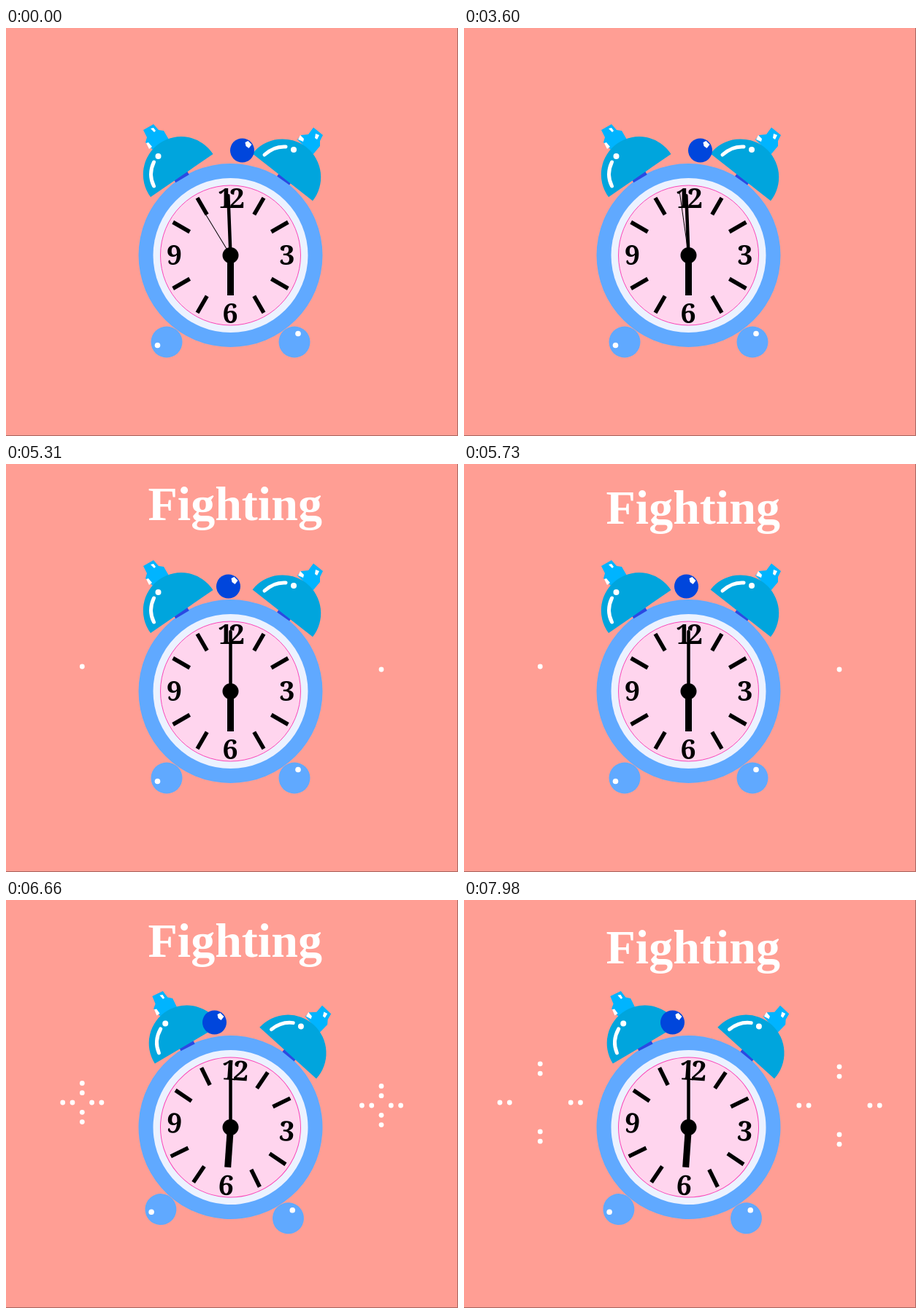
Write an HTML page that moves like this. It is 619x560 px and loops after 8 s.

```html
<!DOCTYPE html>
<html lang="en">
<head>
<meta charset="utf-8">
<title>Alarm clock</title>
<style>
  html, body { margin: 0; width: 100%; height: 100%; overflow: hidden; background: #ff9e94; }
  svg { display: block; width: 619px; height: 560px; }
  text { font-weight: bold; }
  #title { font-family: "Liberation Serif", "Times New Roman", serif; font-size: 66px; }
  .digits { font-family: "Noto Serif", serif; font-size: 37.5px; text-anchor: middle; }
  .blue { fill: #60a9ff; }
  .bell { fill: #00a5dd; }
  .cap { fill: #00b4ff; }
  .shine { fill: none; stroke: #fff; stroke-width: 5; stroke-linecap: round; }
  .white { fill: #fff; }
  .black { stroke: #000; }
</style>
</head>
<body>
<svg viewBox="0 0 619 560">
  <rect width="619" height="560" fill="#ff9e94"/>
  <path d="M618.5 0V559.5H0" fill="none" stroke="#a8655f"/>

  <g id="party" class="white" visibility="hidden">
    <g id="sparks"></g>
    <text id="title" x="194.5" y="76.8">Fighting</text>
  </g>

  <g id="body">
    <g class="blue">
      <circle cx="220" cy="431" r="21.5"/>
      <circle cx="395" cy="431" r="21.5"/>
      <circle cx="307.5" cy="312" r="126"/>
    </g>
    <g class="white">
      <circle cx="207.5" cy="435.5" r="3.8"/>
      <circle cx="400" cy="419.5" r="3.8"/>
    </g>
    <path d="M231 210L249.5 199M372.5 201.5L389.5 213.500" stroke="#2b49e2" stroke-width="5"/>

    <!-- left bell -->
    <path class="cap" d="M188 140L202 132L209 140L216 141L223 153L202 168L191 157L193 150Z"/>
    <path class="white" d="M198 138l4-1 3 4-2 2zM192 158l3-1 5 6-4 3z"/>
    <path class="bell" d="M198 232A51.97 51.97 0 1 1 283.5 173Z"/>
    <path class="shine" d="M202.5 184Q194.5 201 202.5 217"/>
    <circle class="white" cx="208.5" cy="176" r="4"/>

    <!-- right bell -->
    <path class="cap" d="M421 136.500L434 147L430 155L430 162L420 174L399 153L404 147L414 146Z"/>
    <path class="white" d="M424 145l5 2-3 6-3-2zM400 153l3-6 5 5-1 4z"/>
    <path class="bell" d="M337.6 172.4A52.4 52.4 0 0 1 420 237.2Z"/>
    <path class="shine" d="M354 174Q367 162 383 163"/>
    <circle class="white" cx="394" cy="167" r="4"/>

    <!-- dial -->
    <circle cx="307.5" cy="312" r="106" fill="#ecf2ff"/>
    <circle cx="307.5" cy="312" r="96" fill="#ffd5ee" stroke="#fa46b8"/>
    <g id="ticks" class="black" stroke-width="5.5"></g>
    <g class="digits">
      <text x="306" y="247" letter-spacing="-5">12</text>
      <text x="385" y="325">3</text>
      <text x="307" y="405">6</text>
      <text x="230.5" y="325">9</text>
    </g>
    <path class="black" d="M307.5 312V367" stroke-width="9"/>
  </g>

  <path id="second" class="black" d="M307.5 312V223.5"/>
  <path id="minute" class="black" d="M307.5 312V230" stroke-width="4.5" stroke-linecap="round"/>
  <circle cx="307.5" cy="312" r="11"/>

  <g id="hammer">
    <circle cy="168" r="16.5" fill="#0046dc"/>
    <path class="white" d="M4 157L8 155L13 160L9 165L5 162Z"/>
  </g>
</svg>
<script>
  const LOOP = 8000, RING = 4500, STEP = 30;
  const SECOND_TICKS = [900, 1800, 2730, 3600];
  const SWING = [-1, 0, 1, 0];
  const SPARK_CENTERS = [[104.3, 278], [514, 282]];
  const get = id => document.getElementById(id);
  const [party, sparks, title, body, second, minute, hammer] =
    ['party', 'sparks', 'title', 'body', 'second', 'minute', 'hammer'].map(get);

  const turn = (el, angle) => el.setAttribute('transform', `rotate(${angle} 307.5 312)`);

  get('ticks').innerHTML = Array.from({ length: 12 }, (_, hour) => hour % 3
    ? `<path d="M307.5 221V247.5" transform="rotate(${hour * 30} 307.5 312)"/>` : '').join('');

  // A burst is a pair of neighbouring rings that travels outward.
  function burst([x, y], stage) {
    const dot = (dx, dy) => `<circle cx="${x + dx}" cy="${y + dy}" r="3.4"/>`;
    const ring = n => {
      if (n === 0) return dot(0, 0);
      const v = n * 13.3, h = v + (n > 2 ? 2 : 0);
      return dot(-h, 0) + dot(h, 0) + dot(0, -v) + dot(0, v);
    };
    return (stage ? ring(stage - 1) : '') + ring(stage);
  }

  // Flat at the top, sharp rebound at the bottom.
  function titleDrop(step) {
    const phase = (step + 50) % 52 / 26 - 1;
    return 47 * Math.abs(phase) ** 3.1;
  }

  function draw(time) {
    const ringing = time >= RING;
    const step = Math.max(0, Math.floor((time - RING) / STEP));
    const swing = ringing ? SWING[step % 4] : 0;
    const passed = SECOND_TICKS.filter(t => time >= t).length;

    turn(second, ringing ? 0 : -31.2 + 5.8 * passed);
    turn(minute, ringing ? 0 : -2.2);
    turn(body, -4 * swing);
    hammer.setAttribute('transform', `translate(${304.5 + 19 * (ringing ? swing : 1)} 0)`);
    party.setAttribute('visibility', ringing ? 'visible' : 'hidden');
    if (ringing) {
      const stage = Math.floor(step % 13 / 2.6);
      sparks.innerHTML = SPARK_CENTERS.map(center => burst(center, stage)).join('');
      title.setAttribute('transform', `translate(0 ${titleDrop(step)})`);
    }
  }

  const start = performance.now();
  function frame() {
    draw((performance.now() - start) % LOOP);
    requestAnimationFrame(frame);
  }
  frame();
</script>
</body>
</html>
```
